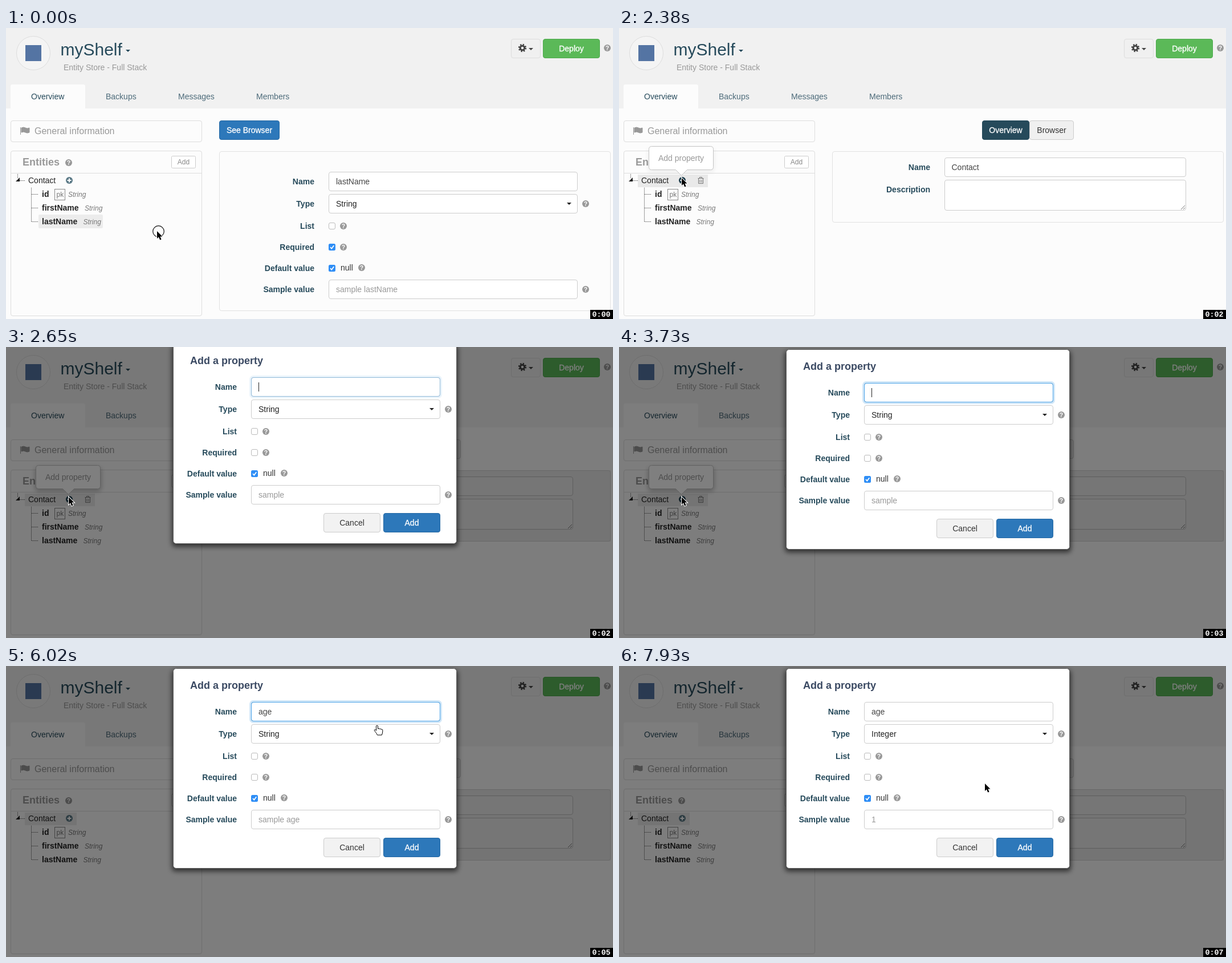
An HTML page for the animation above (8000 ms loop, 1065 by 510 pixels).

```html
<!DOCTYPE html>
<html lang="en">
<head>
<meta charset="utf-8">
<title>Add a property</title>
<style>
html, body { margin: 0; width: 100%; height: 100%; overflow: hidden; background: #fcfcfc; }
svg { display: block; }
text { font-family: "Liberation Sans", Arial, sans-serif; white-space: pre; }
.b { font-weight: bold; }
.i { font-style: italic; }
.med { stroke: #fff; stroke-width: .3px; }
</style>
</head>
<body>
<svg id="stage" width="1065" height="510" viewBox="0 0 1065 510" xmlns="http://www.w3.org/2000/svg"></svg>
<script>
const LOOP = 8000;
const INK = '#264a5b', GREY = '#999', LINE = '#ddd', EDGE = '#ccc', BLUE = '#2d78ba', PAGE = '#fcfcfc';

// ---- drawing helpers: each returns SVG markup ----
const text = (x, y, s, fill = '#333', size = 14, cls = '', anchor = 'start', id = '') =>
  `<text x="${x}" y="${y}" fill="${fill}" font-size="${size}" class="${cls}" text-anchor="${anchor}"${id && ` id="${id}"`}>${s}</text>`;
const rect = (x, y, w, h, fill, extra = '') =>
  `<rect x="${x}" y="${y}" width="${w}" height="${h}" fill="${fill}" ${extra}/>`;
const box = (x, y, w, h, fill = '#fff', stroke = EDGE, r = 3.5) =>
  rect(x + .5, y + .5, w - 1, h - 1, fill, `stroke="${stroke}" rx="${r}"`);
const path = (d, fill = 'none', extra = '') => `<path d="${d}" fill="${fill}" ${extra}/>`;
const group = (id, inner, extra = '') => `<g id="${id}" ${extra}>${inner}</g>`;
const help = (x, y) => `<circle cx="${x}" cy="${y}" r="6" fill="${GREY}"/>` +
  text(x, y + 3.7, '?', '#fff', 10.5, 'b', 'middle');
const caretDown = (x, y, fill = '#222') => path(`M${x} ${y}h8l-4 4z`, fill);
const button = (x, y, w, h, label, fill, stroke, ink, cls = '') =>
  box(x, y, w, h, fill, stroke) + text(x + w / 2, y + h / 2 + 5, label, ink, 14, cls, 'middle');
const label = (x, y, s) => text(x, y + 5, s, INK, 14, 'b', 'end');
const check = (x, y, on) => on
  ? rect(x - 6, y - 6, 12, 12, '#2f8ef6', 'rx="2.5"') +
    path(`M${x - 3} ${y}l2.3 2.6 4-5.4`, 'none', 'stroke="#fff" stroke-width="1.7"')
  : box(x - 6, y - 6, 12, 12, '#fff', '#bbb', 2.5);
const dots = d => path(d, 'none', 'stroke="#444" stroke-dasharray="1 1"');
const glow = (id, x, y, w, h) => group(id,
  rect(x - 1, y - 1, w + 2, h + 2, 'none', 'rx="5" stroke="#66afe9" stroke-width="4" opacity=".3"') +
  box(x, y, w, h, 'none', '#4ba3e8'));

// property form; y is the middle of its first row
function form(x, w, y, id, name, sample, required) {
  const rows = [0, 39, 78, 115, 152, 189].map(d => y + d);
  const names = ['Name', 'Type', 'List', 'Required', 'Default value', 'Sample value'];
  const [n, t, l, r, d, s] = rows;
  return names.map((v, i) => label(x - 25, rows[i], v)).join('') +
    [n, t, s].map(v => box(x, v - 17, w, 34)).join('') +
    text(x + 13, n + 5, name, '#444', 14, '', 'start', id + 'Name') +
    text(x + 13, t + 5, 'String', '#222', 14, '', 'start', id + 'Type') +
    group(id + 'Arrow', caretDown(x + w - 19, t - 2)) +
    text(x + 13, s + 5, sample, GREY, 14, '', 'start', id + 'Sample') +
    check(x + 6, l, false) + check(x + 6, r, required) + check(x + 6, d, true) +
    text(x + 21, d + 4, 'null', '#333') +
    help(x + 26, l) + help(x + 26, r) + help(x + 58, d - 1) +
    help(x + w + 14, t) + help(x + w + 14, s);
}

function header() {
  const tabs = [[175, 'Backups'], [302, 'Messages'], [439, 'Members']];
  return rect(0, 0, 1065, 141, '#f1f1f1') +
    path('M8 141V102q0-3 3-3H136q3 0 3 3V141z', PAGE) +
    `<circle cx="48" cy="44" r="29.5" fill="#f4f4f4" stroke="${LINE}"/>` +
    rect(34, 30, 28, 28, '#5474a3') +
    text(95.5, 48, 'myShelf', INK, 30) + caretDown(210, 38, INK) +
    text(101, 74, 'Entity Store - Full Stack', GREY) +
    text(44, 125, 'Overview', INK) +
    tabs.map(([x, s]) => text(x, 125, s, '#4d6b7a')).join('') +
    box(886, 19, 52, 34, '#f0f0f0', LINE) +
    '<g fill="none" stroke="#444"><circle cx="906" cy="35" r="3.8" stroke-width="3"/>' +
    '<circle cx="906" cy="35" r="6" stroke-width="2.4" stroke-dasharray="2.356"/></g>' +
    caretDown(917, 35, '#444') +
    button(942, 19, 100, 34, 'Deploy', '#5bb958', '#4ca94b', '#fff', 'med') + help(1055, 35);
}

function sidebar() {
  const row = (y, name, x) => text(63, y, name, '#222', 14, 'b') + text(x, y, 'String', '#777', 12, 'i');
  return box(8, 162, 336, 38, PAGE, LINE) +
    path('M25.5 174v13M27 175q4-2 7 0t7 0v8q-4 2-7 0t-7 0z', GREY, `stroke="${GREY}"`) +
    text(50, 186, 'General information', GREY, 16) +
    box(8, 215, 336, 290, PAGE, LINE) + path('M9 254.5H343', 'none', `stroke="${LINE}"`) +
    text(29, 241, 'Entities', GREY, 18, 'b') + help(110, 236) +
    box(290, 224, 43, 22, '#fff', EDGE, 2) + text(311.5, 239, 'Add', '#888', 12, '', 'middle') +
    rect(33, 257, 91, 22, '#e9e9e9', 'id="rowBg"') +
    rect(57, 327, 113, 24, '#ececec', 'rx="2" id="lastBg"') +
    dots('M20.5 256v8M24 267.5h9M44.5 280v60M45 291.5h12M45 315.5h12M45 339.5h12') +
    path('M24 262v7h-7z', '#222') +
    text(39, 272, 'Contact', '#222') +
    '<circle id="plus" cx="111" cy="267" r="6"/>' +
    path('M107.5 267h7M111 263.5v7', 'none', 'stroke="#fff" stroke-width="2"') +
    group('trash', path('M138.5 263.5h10M141.5 263v-1.500h4v1.500M139.500 264v8.500h8v-8.500M142 266v5M145 266v5', 'none', 'stroke="#777"')) +
    row(296, 'id', 109) + row(320, 'firstName', 138) + row(344, 'lastName', 135.5) +
    box(85, 282, 19, 20, 'none', '#888', 0) + text(88.5, 296, 'pk', '#777', 12);
}

const detail = () => group('detail',
  button(374, 162, 106, 34, 'See Browser', BLUE, '#2568a3', '#fff', 'med') +
  box(374, 216, 687, 280, 'none', '#e2e2e2') +
  form(566, 437, 269, 'd', 'lastName', 'sample lastName', true));

const entity = () => group('entity',
  button(720, 162, 78, 34, 'Browser', '#f0f0f0', EDGE, '#333') +
  button(637, 162, 83, 34, 'Overview', INK, INK, '#fff', 'med') +
  box(374, 216, 687, 125, 'none', '#e2e2e2') +
  label(546, 244, 'Name') + label(546, 283, 'Description') +
  box(571, 227, 424, 34) + text(583.5, 249, 'Contact', '#444') +
  box(571, 266, 424, 54) + path('M986 318l7-7M990 318l3-3', 'none', 'stroke="#777"'));

const tip = () => group('tip',
  rect(51, 211, 116, 42, '#000', 'rx="6" filter="url(#soft)" id="tipShade"') +
  path('M57.500 207.500h103q5 0 5 5v31q0 5-5 5h-41l-10 10-10-10h-42q-5 0-5-5v-31q0-5 5-5z', '#fff', 'stroke="#c4c4c4"') +
  text(109, 233, 'Add property', GREY, 14, '', 'middle'));

const ITEMS = ['String', 'Integer', 'Boolean', 'Date', 'Long', 'Float', 'Double'];
const menu = () => group('menu',
  rect(431, 140, 331, 198, '#000', 'filter="url(#soft)" opacity=".25"') +
  box(430, 134, 332, 201, '#fff', '#bbb', 3) +
  box(430, 102, 332, 34, '#fff', '#4ba3e8') +
  text(443, 124, 'Data type', GREY) +
  '<g clip-path="url(#list)">' + text(451, 156, 'Primitive', '#777', 12) +
  rect(431, 164, 315, 26, '#3f8acb', 'id="pick"') +
  ITEMS.map((s, i) => text(451, 182 + 26 * i, s, '#333', 14, '', 'start', 'item' + i)).join('') + '</g>' +
  rect(746, 136, 15, 198, '#fafafa') + path('M746.500 136v198', 'none', 'stroke="#e6e6e6"') +
  rect(750, 139, 8, 106, '#c1c1c1', 'rx="4"'));

const modal = () => group('modal',
  rect(291, 7, 502, 353, '#000', 'rx="6" filter="url(#soft)" opacity=".6"') +
  box(293, 4, 498, 351, '#fff', '#666', 5) +
  text(323, 40, 'Add a property', '#3b4a63', 18, 'b') +
  form(430, 332, 80, 'm', '', 'sample', false) +
  button(557, 301, 100, 34, 'Cancel', '#f2f2f2', EDGE, '#333') +
  button(662, 301, 100, 34, 'Add', BLUE, '#2568a3', '#fff', 'med') +
  glow('nameGlow', 430, 63, 332, 34) + menu() + glow('typeGlow', 430, 102, 332, 34) +
  rect(443, 72, 1, 16, '#222', 'id="nameCaret"') + rect(443, 111, 1, 16, '#222', 'id="typeCaret"'));

const pointer = () => group('pointer',
  '<circle id="ring" cx="2.5" cy=".5" r="9.8" fill="none" stroke="#111" stroke-width="1.2"/>' +
  path('M0 0V13L3 10.300 5.200 15.500 7.600 14.500 5.400 9.500H9.500Z', '#000',
    'id="arrow" stroke="#fff" stroke-width="2" paint-order="stroke"') +
  path('M-1.500 1Q0-1 1.500 1V6Q3 4.800 4.500 6.300 6 5.300 7.300 7 9.500 6.200 9.800 8.500V11Q9.500 14 8.300 17H.5Q-.5 14-4.500 9.500-5.500 7.500-3.500 7.500L-1.500 9Z',
    '#fff', 'id="hand" stroke="#000"'));

const stage = document.getElementById('stage');
stage.innerHTML =
  '<defs><filter id="soft" x="-20%" y="-30%" width="140%" height="160%"><feGaussianBlur stdDeviation="4.5"/></filter>' +
  '<clipPath id="list"><rect x="431" y="136" width="315" height="198"/></clipPath></defs>' +
  rect(0, 0, 1065, 510, PAGE) + header() + sidebar() + detail() + entity() + tip() +
  group('shade', rect(0, 0, 1065, 510, '#000', 'opacity=".5"') + rect(374, 216, 687, 125, '#000', 'opacity=".07"')) +
  modal() + pointer() + rect(1025, 494, 40, 16, '#000') +
  '<text id="clock" x="1028.5" y="505.5" fill="#fff" font-size="13.3" font-weight="bold" style="font-family:\'Liberation Mono\',monospace"></text>';

// ---- state by time ----
const el = {};
stage.querySelectorAll('[id]').forEach(e => el[e.id] = e);
const set = (id, k, v) => el[id].setAttribute(k, v);
const show = (id, on) => set(id, 'display', on ? 'inline' : 'none');
const write = (id, s) => { if (el[id].textContent !== s) el[id].textContent = s; };
const within = (t, ...spans) => spans.some(([a, b]) => t >= a && t < b);
// value of the last [time, value] pair already reached
const at = (t, first, ...pairs) => pairs.reduce((v, [when, next]) => t >= when ? next : v, first);

const smooth = p => p * p * (3 - 2 * p), flat = p => p;
const START = [265, 356];
// from, to, count of steps, end point, easing
const MOVES = [
  [410, 1210, 10, [132, 260], smooth],
  [1300, 1760, 6, [110, 263], p => 1 - (1 - p) ** 2],
  [5070, 5810, 9, [653, 103], smooth],
  [5930, 6310, 5, [645, 110], flat],
  [6820, 7280, 6, [642, 206], p => p ** .75]
];

function pointerAt(t) {
  let pos = START;
  for (const [from, to, n, end, ease] of MOVES) {
    if (t < from) break;
    const step = Math.floor((t - from) / (to - from) * (n - 1) + 1e-6) + 1;
    const p = ease(Math.min(1, step / n));
    pos = pos.map((v, i) => v + (end[i] - v) * p);
  }
  return pos;
}

function draw(t) {
  const [x, y] = pointerAt(t);
  const open = within(t, [6600, 7810]);
  const hover = within(t, [1300, 5250]);
  const chosen = t >= 2380;

  show('detail', !chosen);
  show('entity', chosen);
  show('lastBg', !chosen);
  show('rowBg', hover || chosen);
  set('rowBg', 'width', hover ? 123 : 91);
  show('trash', hover);
  set('plus', 'fill', within(t, [1480, 5250]) ? '#173746' : '#5d7b88');
  set('tip', 'opacity', at(t, 0, [1480, .3], [1570, .7], [1660, .9], [1760, 1], [5250, .4], [5340, 0]));
  set('tipShade', 'opacity', t < 2500 ? .06 : .25);

  set('shade', 'opacity', at(t, 0, [2500, .5], [2650, 1]));
  set('modal', 'opacity', at(t, 0, [2500, .4], [2650, 1]));
  set('modal', 'transform', `translate(0 ${at(t, -88, [2500, -50], [2650, -10], [2800, 0])})`);

  const name = at(t, '', [3900, 'a'], [4080, 'ag'], [4360, 'age']);
  const done = t >= 7810;
  write('mName', name);
  write('mType', done ? 'Integer' : 'String');
  write('mSample', done ? '1' : ('sample ' + name).trim());
  set('nameGlow', 'opacity', at(t, 0, [2650, .45], [2800, 1], [6600, .5], [6700, 0]));
  set('typeGlow', 'opacity', at(t, 0, [6600, .4], [6700, .8], [6820, 1], [7810, .4], [7930, 0]));
  show('nameCaret', within(t, [2500, 3280], [3730, 4810], [5310, 5810], [6310, 6600]));
  set('nameCaret', 'x', 443 + Math.round(name.length * 7.7));
  show('typeCaret', within(t, [6600, 7180]));

  show('menu', open);
  const row = y > 190 ? 1 : 0;
  set('pick', 'y', 164 + 26 * row);
  ITEMS.forEach((_, i) => set('item' + i, 'fill', i === row ? '#fff' : '#333'));

  const hand = t >= 5070 && !done && x > 430 && (open || y < 136);
  set('pointer', 'transform', `translate(${Math.round(x)} ${Math.round(y)})`);
  show('arrow', !hand);
  show('hand', hand);
  show('ring', within(t, [0, 80], [2030, 2210], [6400, 6600], [7280, 7460]));

  write('clock', '0:0' + at(t, 0, [1030, 1], [2030, 2], [3100, 3], [4080, 4], [5070, 5], [6110, 6], [7180, 7]));
}

const begin = performance.now();
function tick() {
  draw((performance.now() - begin) % LOOP);
  requestAnimationFrame(tick);
}
tick();
</script>
</body>
</html>
```
